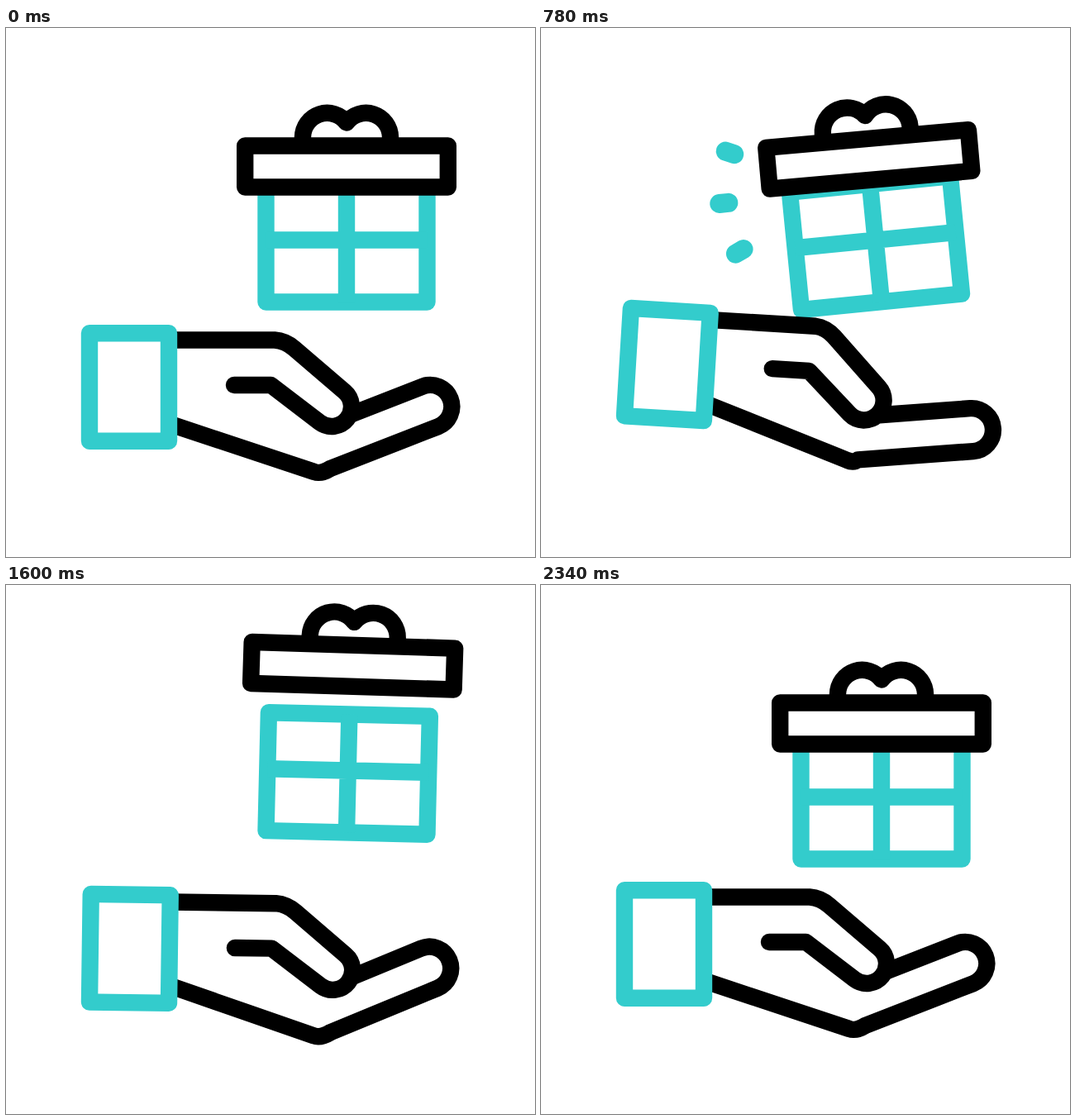
An HTML page that plays this animation: 640 px wide and 640 px high, repeating every 2820 ms.

```html
<!DOCTYPE html>
<html lang="en">
<head>
<meta charset="utf-8">
<title>Gift toss</title>
<style>
  html, body { margin: 0; width: 100%; height: 100%; overflow: hidden; background: #fff; }
  svg { display: block; width: 100%; height: 100%; }
  path, rect { fill: none; stroke: #000; stroke-width: 20.4; stroke-linejoin: round; }
  .teal { stroke: #33cccc; }
  .solid { fill: #fff; }
  .round { stroke-linecap: round; }
  #streaks path { stroke-width: 23; }
</style>
</head>
<body>
<svg viewBox="0 0 640 640">
  <g id="gift">
    <g id="streaks">
      <path class="teal round"/>
      <path class="teal round"/>
      <path class="teal round"/>
    </g>
    <rect class="teal" x="-97.5" y="-143" width="195" height="143"/>
    <path class="teal" d="M0-143V0M-97.5-75H97.5"/>
  </g>
  <g id="lid">
    <path d="M-53-25V-35.5A29.5 29.5 0 0 1 0-53A29.5 29.5 0 0 1 53-35.5V-25"/>
    <rect class="solid" x="-122.8" y="-25" width="245.6" height="50"/>
  </g>
  <g id="hand">
    <path id="finger"/>
    <path id="thumb" class="solid round"/>
    <rect class="teal" x="101" y="369.3" width="96" height="130.5"/>
  </g>
</svg>
<script>
const LOOP = 2820, RAD = Math.PI / 180;
const $ = id => document.getElementById(id);

// Beats: rest, wind-up, throw, peak, catch, second peak, settle, rest.
const giftBeats = [0, 400, 690, 990, 1300, 1700, 2030, 2340];
const handBeats = [0, 375, 745, 980, 1300, 1740, 2060, 2340];

const clamp = u => Math.min(1, Math.max(0, u));
const progress = (t, from, to) => clamp((t - from) / (to - from));
const ease = u => u * u * (3 - 2 * u);
const fmt = p => p.map(n => n.toFixed(2)).join(' ');
const mix = (a, b, u) => a.map((n, i) => n + (b[i] - n) * u);
const polar = ([x, y], r, deg) => [x + r * Math.cos(deg * RAD), y + r * Math.sin(deg * RAD)];

// Eases through one value per beat; missing values are 0.
function follow(beats, t, ...values) {
  return beats.slice(1).reduce((sum, end, i) => {
    const step = (values[i + 1] ?? 0) - (values[i] ?? 0);
    return sum + step * ease(progress(t, beats[i], end));
  }, values[0]);
}

// Quick rise and slower fall of the lid above the box.
const pop = (t, from, to) =>
  48 * Math.max(0, Math.sin(Math.PI * progress(t, from, to) ** 0.8)) ** 2.5;

function drawGift(t) {
  const base = [412, 331.5 + follow(giftBeats, t, 0, 11, 11, -41, 11, -40, 4)];
  const rot = follow(giftBeats, t - 55, 0, 0, -6.6, 19, -7.7, 5.9);
  const lift = pop(t, 700, 1420) + pop(t, 1420, 2060);
  const [x, y] = polar(base, 164, rot - 90);
  const swing = 0.9 + 0.5 * ease(progress(t, 1000, 1800));
  $('gift').setAttribute('transform', `translate(${base}) rotate(${rot})`);
  $('lid').setAttribute('transform',
    `translate(${x + lift * 0.1} ${y - lift}) rotate(${rot * swing})`);
}

// Three rays shoot outwards from the side of the box.
function drawStreaks(t) {
  const head = ease(progress(t, 610, 1204)), tail = ease(progress(t, 855, 1449));
  [...$('streaks').children].forEach((ray, i) => {
    const at = u => fmt(polar([-34.5, -137.5], 138 + 56 * u, 180 + 24.7 * (1 - i)));
    ray.setAttribute('d', head - tail > 0.001 ? `M${at(tail)}L${at(head)}` : '');
  });
}

function drawThumb(turn) {
  const tip = polar([330, 403], 84.4, 40.7 + turn);
  const top = polar(tip, 24, -50 + turn), low = polar(tip, 24, 127 + turn);
  const bend = [338, 378.5];
  $('thumb').setAttribute('d',
    `M199 377.5H325Q${fmt(bend)} ${fmt(mix(bend, top, 0.15))}L${fmt(top)}` +
    `A24 24 0 0 1 ${fmt(low)}L320.5 432H276`);
}

function drawFinger(turn) {
  const tip = polar([378, 508], 144.3, -20.3 + turn), dir = -21.3 + turn;
  const top = polar(tip, 26, dir - 90), low = polar(tip, 26, dir + 90);
  $('finger').setAttribute('d',
    `M199 479.2L373 537Q381 540 ${fmt(polar(low, -140, dir))}L${fmt(low)}` +
    `A26 26 0 0 0 ${fmt(top)}L${fmt(polar(top, -110, dir))}`);
}

function drawHand(t) {
  const y = follow(handBeats, t, 0, 55.5, -34.6, 33, -28, 15, -4);
  const rot = follow(handBeats, t - 60, 0, -13.5, 3.7, 4.4, -3.1, 3.7);
  const curl = follow(handBeats, t - 60, 0, -16.2, 14, -18.5, -5.3, 0.7);
  $('hand').setAttribute('transform', `translate(0 ${y}) rotate(${rot} 101 500)`);
  drawThumb(curl * 0.37);
  drawFinger(curl);
}

function draw(t) {
  drawGift(t);
  drawStreaks(t);
  drawHand(t);
}

let start;
function tick(now) {
  start ??= now;
  draw(Math.max(0, now - start) % LOOP);
  requestAnimationFrame(tick);
}
draw(0);
requestAnimationFrame(tick);
</script>
</body>
</html>
```
